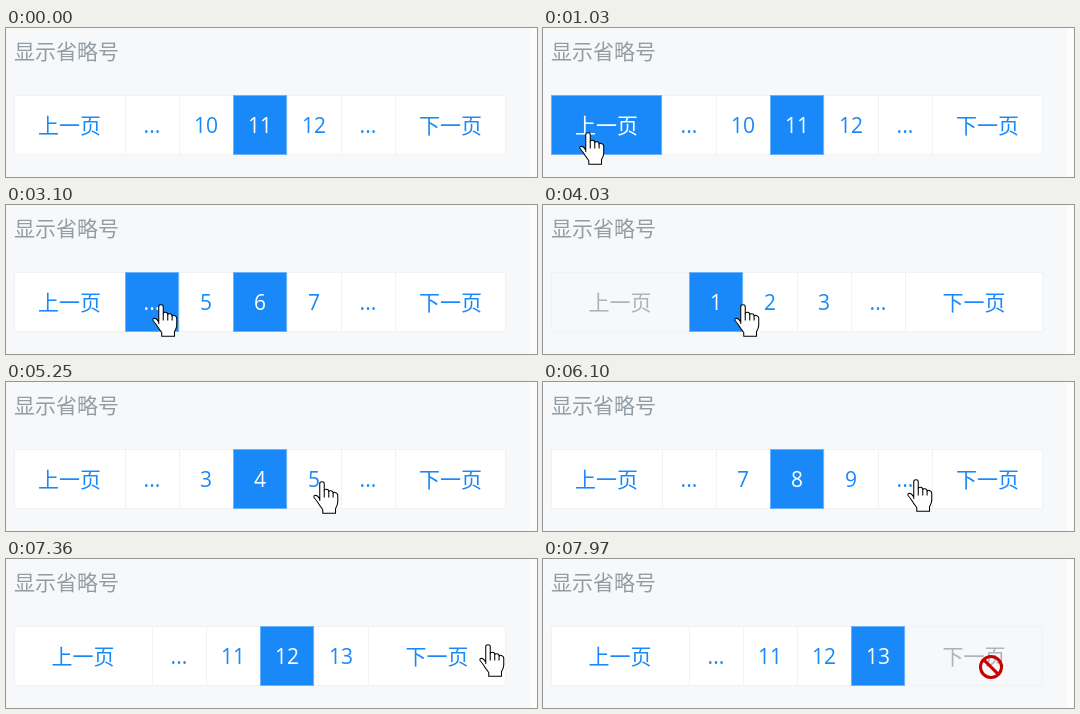
Animation, 531 px wide and 149 px high, one loop 8 s. Source, as an HTML page:

```html
<!DOCTYPE html>
<html lang="zh">
<head>
<meta charset="utf-8">
<style>
html, body { margin: 0; width: 100%; height: 100%; overflow: hidden; }
body { position: relative; background: linear-gradient(90deg, #f7f8fa 524px, #fcfcfd 524px); }
h2, .cell { position: absolute; margin: 0; font: 300 21px "Noto Sans CJK SC", "Noto Sans CJK", sans-serif; white-space: nowrap; }
h2 { left: 8px; top: 0; line-height: 44px; color: #929da4; }
.cell {
  top: 67px; height: 60px; line-height: 58px; box-sizing: border-box;
  text-align: center; color: #1989fa; background: #fff;
  box-shadow: inset 1px 1px #f1f2f5, inset 0 -1px #f1f2f5;
}
.page { font-family: "Open Sans", "Noto Sans", sans-serif; font-weight: 400; line-height: 60px; }
.cell:last-child { box-shadow: inset 1px 1px #f1f2f5, inset -1px -1px #f1f2f5; }
.cell.on { color: #fff; background: #1989fa; box-shadow: inset 0 0 0 1px #6bb2f9; }
.cell.off { color: #b0b2b5; background: #f7f8fa; }
svg { position: absolute; left: 0; top: 0; width: 531px; height: 149px; }
</style>
</head>
<body>
<h2>显示省略号</h2>
<div id="bar"></div>
<svg viewBox="0 0 531 149">
  <g id="cursor">
    <path id="arrow" fill="#fff" stroke="#000" stroke-width=".7" transform="scale(1.5)"
      d="M.5 .5V16L4 12.7 6.4 18.3 8.8 17.3 6.4 11.7H11.5Z"/>
    <g id="hand" fill="#fff" stroke="#000" stroke-width=".7" stroke-linejoin="round" transform="scale(1.5) translate(-6 0)">
      <path d="M4.5 13V1.8Q4.5 .5 6 .5T7.5 1.8V6.2Q7.6 5.4 9 5.5 10.5 5.6 10.5 7 10.7 6.3 12 6.5 13.4 6.7 13.4 8 13.7 7.4 14.8 7.6 16.5 8 16.5 9.5V14Q16.5 16 15 18.5V21.5H6.5V19Q4.5 16.5 3 14 1.5 12 .7 11 .3 9.5 1.8 9.5 3 9.6 4.5 12Z"/>
      <path fill="none" d="M7.5 6V11M10.5 7V11M13.4 8V11"/>
    </g>
    <g id="ban" fill="none" stroke="#c80000" stroke-width="3" transform="translate(0 3)">
      <circle r="10.5"/><path d="M-7.4-7.4 7.4 7.4"/>
    </g>
  </g>
</svg>
<script>
const LOOP = 8000, PAGES = 13, ENTER = 250, MOVE = 250, HOLD = 90;
const $ = id => document.getElementById(id);

// Pointer stops: arrival time, place and the button presses made there
const stops = [
  { at: 0, x: 159, y: 140 },
  { at: 530, x: 187, y: 103 },
  { at: 850, x: 45, y: 104, press: [1030] },
  { at: 1650, x: 222, y: 99 },
  { at: 2100, x: 157, y: 105, press: [2190, 2620] },
  { at: 2960, x: 155, y: 99, press: [3100, 3290, 3470] },
  { at: 4100, x: 210, y: 99 },
  { at: 4600, x: 316, y: 99, press: [4770] },
  { at: 5500, x: 360, y: 99, press: [5550, 5740] },
  { at: 6300, x: 482, y: 85, press: [6400, 6660, 7030, 7240, 7460] },
  { at: 7970, x: 448, y: 105 }
];

function pointer(t) {
  let { x, y } = stops[0];
  for (const s of stops) {
    const u = Math.min(Math.max((t - s.at) / MOVE + 1, 0), 1);
    const k = u * u * (3 - 2 * u);
    x += (s.x - x) * k;
    y += (s.y - y) * k;
  }
  return { x, y };
}

// Three page numbers around the current one, dots where pages are hidden
function layout(page) {
  const first = Math.min(Math.max(page - 1, 1), PAGES - 2), last = first + 2;
  const cells = [];
  for (let n = first; n <= last; n++) cells.push({ label: n, to: n, on: n === page });
  if (first > 1) cells.unshift({ label: '...', to: first - 1 });
  if (last < PAGES) cells.push({ label: '...', to: last + 1 });
  for (const c of cells) Object.assign(c, { w: 54, cls: 'page' });
  const w = (492 - cells.length * 54) / 2;
  cells.unshift({ label: '上一页', to: page - 1, w, cls: '', off: page === 1 });
  cells.push({ label: '下一页', to: page + 1, w, cls: '', off: page === PAGES });
  let x = 8;
  for (const c of cells) {
    c.x = x;
    x += c.w;
  }
  return cells;
}

const cellAt = (cells, { x, y }) =>
  y < 127 && cells.find(c => x >= c.x && x < c.x + c.w);

function draw(now) {
  const t = now % LOOP;
  let cells = layout(11);
  for (const down of stops.flatMap(s => s.press || [])) {
    if (t < down) break;
    const cell = cellAt(cells, pointer(down));
    if (t < down + HOLD) cell.on = true;
    else cells = layout(cell.to);
  }
  const html = cells.map(c =>
    `<div class="cell ${c.cls} ${c.off ? 'off' : c.on ? 'on' : ''}" style="left:${c.x}px;width:${c.w}px">${c.label}</div>`
  ).join('');
  if (html !== draw.html) $('bar').innerHTML = draw.html = html;

  const p = pointer(t), over = cellAt(cells, p);
  const kind = t < ENTER ? '' : !over ? 'arrow' : over.off ? 'ban' : 'hand';
  $('cursor').setAttribute('transform', `translate(${Math.round(p.x)} ${Math.round(p.y)})`);
  for (const id of ['arrow', 'hand', 'ban']) $(id).style.display = id === kind ? '' : 'none';
}

const begin = performance.now();
function tick() {
  draw(performance.now() - begin);
  requestAnimationFrame(tick);
}
tick();
</script>
</body>
</html>
```
